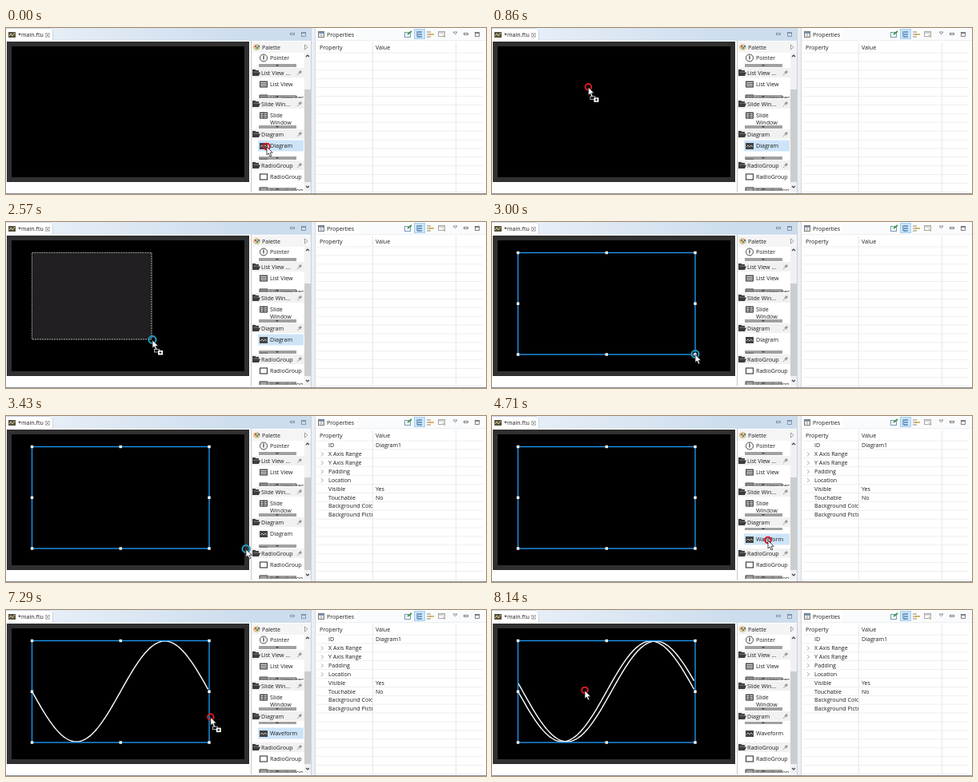
An HTML page with a canvas that plays this animation: 600 px wide and 208 px high, repeating every 8710 ms.

```html
<!DOCTYPE html>
<html lang="en">
<head>
<meta charset="utf-8">
<title>Diagram editor</title>
<style>
html, body { margin: 0; width: 100%; height: 100%; overflow: hidden; background: #fff; }
canvas { display: block; width: 600px; height: 208px; }
</style>
</head>
<body>
<canvas id="stage" width="600" height="208"></canvas>
<script>
const ctx = document.getElementById('stage').getContext('2d');
const LOOP = 8710, STEP = LOOP / 61, LAST = 57;
const INK = '#1c1c1c', DARK = '#444', BLUE = '#1e95ef', PICKED = '#cde4f8';
const BOX = { x: 32.5, y: 38.5, w: 221.5, h: 127.5 };

// Pointer way points: time, x, y
const PATH = [
  [0, 326, 149], [140, 322, 147], [1140, 42, 46], [1710, 55, 48], [2000, 33, 39],
  [2570, 183, 148], [3000, 254, 166], [3430, 300, 167], [3860, 342, 165],
  [4280, 342, 165], [4710, 345, 156], [5200, 150, 104], [5570, 150, 104],
  [6290, 303, 162], [6850, 345, 157], [7000, 345, 157], [7700, 122, 101], [8140, 116, 101]
];

function rect(x, y, w, h, color) {
  ctx.fillStyle = color;
  ctx.fillRect(x, y, w, h);
}

function frame(x, y, w, h, color, width = 1) {
  ctx.strokeStyle = color;
  ctx.lineWidth = width;
  ctx.strokeRect(x, y, w, h);
}

function line(points, color, width = 1) {
  ctx.beginPath();
  points.forEach(([x, y]) => ctx.lineTo(x, y));
  ctx.strokeStyle = color;
  ctx.lineWidth = width;
  ctx.stroke();
}

function shape(points, fill, stroke) {
  ctx.beginPath();
  points.forEach(([x, y]) => ctx.lineTo(x, y));
  ctx.closePath();
  if (fill) { ctx.fillStyle = fill; ctx.fill(); }
  if (stroke) { ctx.strokeStyle = stroke; ctx.lineWidth = 0.8; ctx.stroke(); }
}

function ring(x, y, r, color, width) {
  ctx.beginPath();
  ctx.arc(x, y, r, 0, Math.PI * 2);
  ctx.strokeStyle = color;
  ctx.lineWidth = width;
  ctx.stroke();
}

function label(text, x, y) {
  ctx.font = '7.1px "Open Sans", "Noto Sans", sans-serif';
  ctx.fillStyle = INK;
  ctx.fillText(text, x, y + 2.6);
}

function clipped(x, y, w, h, paint) {
  ctx.save();
  ctx.beginPath();
  ctx.rect(x, y, w, h);
  ctx.clip();
  paint();
  ctx.restore();
}

function windowButtons(x, y, color) {
  frame(x + 0.5, y - 0.5, 5, 2, color, 0.8);
  frame(x + 14.5, y - 1.5, 5, 5, color, 0.8);
  line([[x + 14, y - 0.7], [x + 20, y - 0.7]], color);
}

function editor() {
  const bar = ctx.createLinearGradient(58, 0, 300, 0);
  bar.addColorStop(0, '#e6eef7');
  bar.addColorStop(1, '#cddded');
  rect(0, 0, 382, 16, bar);
  rect(0, 1, 58, 16, '#fff');
  line([[0, 0.5], [55, 0.5], [58.5, 4], [58.5, 16]], '#c3cfdd', 0.8);
  rect(3, 5, 9, 7, '#56523c');
  line([[4, 10], [6, 7], [8, 10], [11, 6]], '#d6d0a0');
  label('*main.ftu', 15, 8);
  frame(49.5, 6.5, 5, 5, '#aaa', 0.7);
  line([[50, 7], [54, 11]], '#888', 0.8);
  line([[54, 7], [50, 11]], '#888', 0.8);
  windowButtons(355, 7, '#7488a0');
  rect(1, 17, 303, 176, '#303030');
  rect(7, 23, 291, 164, '#000');
  rect(381, 0, 1, 207, '#c8d2de');
  rect(382, 0, 4, 207, '#eceff3');
}

function folder(y) {
  shape([[308, y - 4], [311.5, y - 4], [312.5, y - 3], [316, y - 3], [316, y - 0.5],
    [318, y - 0.5], [316, y + 4], [308, y + 4]], '#3c3c3c');
  line([[309.5, y - 0.8], [316, y - 0.8]], '#aaa', 0.6);
}

function section(name, y) {
  rect(307, y - 6, 66, 12, '#f1f1f1');
  folder(y);
  label(name, 319, y);
  line([[364, y + 3], [366, y + 1]], '#888', 0.8);
  shape([[366, y - 1], [368, y - 3], [370, y - 1], [368, y + 1], [368, y + 2], [365, y - 1]], '#999');
}

function icon(kind, y) {
  if (kind === 'gauge') {
    ring(322, y, 4.5, DARK, 1);
    line([[322, y - 3], [322, y + 2]], '#333', 1.2);
    return;
  }
  if (kind === 'radio') {
    frame(317.5, y - 3.5, 9, 7, DARK, 1.2);
    return;
  }
  rect(317, y - 4, 10, 8, DARK);
  if (kind === 'wave') {
    line([[318, y + 1], [320, y - 1], [322, y + 1], [324, y - 1], [326, y + 1]], '#ddd', 0.8);
    return;
  }
  [-2, 0, 2].forEach(d => line([[318, y + d], [326, y + d]], '#e4e4e4', 1.1));
  if (kind === 'slide') line([[322, y - 4], [322, y + 4]], DARK);
}

function item(kind, text, y, picked) {
  if (picked) rect(315, y - 7, 57, 14, PICKED);
  icon(kind, y + 0.5);
  label(text, 330, y);
}

function scroller(y, up) {
  rect(316, y, 47, 4, 'rgba(125,125,125,.72)');
  shape(up ? [[337, y + 3], [341, y + 3], [339, y + 1]] : [[337, y + 1], [341, y + 1], [339, y + 3]], DARK);
}

// Top slice of the next entry in a scrolled list
function peek(kind, text, y) {
  clipped(315, y - 2, 57, 6, () => item(kind, text, y + 3));
  scroller(y);
}

function palette(tool, scroll) {
  rect(306, 16, 75, 191, '#fff');
  line([[306.5, 16], [306.5, 206]], '#c8c8c8');
  rect(307, 17, 74, 14, '#f5f5f5');
  ctx.beginPath();
  ctx.ellipse(313.5, 24, 4.5, 4, 0, 0, 7);
  ctx.fillStyle = '#d9c49a';
  ctx.fill();
  ['#d04b38', '#4d9a48', '#4677b8'].forEach((c, i) => rect(311 + i * 2, 22 + i % 2 * 2, 2, 2, c));
  label('Palette', 320, 24);
  shape([[373.5, 21], [377, 24], [373.5, 27]], '#fff', '#888');

  clipped(307, 31, 66, 18, () => item('gauge', 'Pointer', 37));
  scroller(45);
  section('List View ...', 56);
  item('list', 'List View', 70);
  peek('list', 'List View Item', 84);
  section('Slide Win...', 95);
  item('slide', 'Slide', 109);
  label('Window', 330, 118);
  scroller(122);
  section('Diagram', 133);
  clipped(307, 140, 66, 25, () => {
    item('wave', 'Diagram', 147.5 - scroll, tool === 'diagram');
    item('wave', 'Waveform', 167 - scroll, tool === 'waveform');
    if (scroll < 12) scroller(161);
    if (scroll > 0) scroller(139, true);
  });
  section('RadioGroup', 172);
  item('radio', 'RadioGroup', 186);
  peek('radio', 'RadioButton', 200);

  rect(373, 31, 8, 174, '#f1f1f1');
  rect(373, 77, 8, 116, '#cdcdcd');
  line([[375, 36], [377, 34], [379, 36]], DARK, 1.2);
  line([[375, 198], [377, 200], [379, 198]], DARK, 1.2);
}

function properties(filled) {
  rect(386, 0, 214, 207, '#fff');
  rect(386, 0, 1, 207, '#d3d9e0');
  rect(438, 1, 162, 15, '#fafbfc');
  rect(387, 15, 213, 1, '#eceff2');
  frame(390.5, 4.5, 7, 7, '#777');
  rect(391, 5, 6, 2, '#7894b5');
  line([[391, 9], [397, 9]], '#999', 0.7);
  line([[394, 7], [394, 11]], '#999', 0.7);
  label('Properties', 401, 8);

  frame(498.5, 5.5, 7, 6, '#7897b4');
  line([[502, 8], [507, 4]], '#3e9a4b', 2);
  rect(510, 1, 14, 13, '#cbe5fb');
  frame(510.5, 1.5, 13, 12, '#a5cfef');
  line([[514, 4], [514, 11], [516, 11]], '#52708e');
  [5, 8, 11].forEach(y => line([[515, y], [520, y]], '#3f78aa', 1.3));
  [5, 8, 11].forEach(y => line([[526, y], [531, y]], '#948467'));
  line([[529, 8], [535, 8]], '#d49c37', 1.5);
  frame(540.5, 4.5, 8, 6, '#aaa');
  line([[541, 6], [549, 6]], '#aaa');
  line([[546, 8], [549, 12]], '#bbaa88');
  shape([[559, 5], [564, 5], [561.5, 8]], '#fff', '#777');
  windowButtons(572, 7, '#666');

  for (let i = 0; i < 17; i++) {
    const y = 31 + i * 10.9;
    line([[388, y], [596, y]], '#eeeef0');
  }
  [458.5, 562.5].forEach(x => line([[x, 18], [x, 206]], '#e8e8ea'));
  label('Property', 392, 24);
  label('Value', 462, 24);
  if (!filled) return;

  const rows = ['ID', '>X Axis Range', '>Y Axis Range', '>Padding', '>Location',
    'Visible', 'Touchable', 'Background Color', 'Background Picture'];
  const values = { ID: 'Diagram1', Visible: 'Yes', Touchable: 'No' };
  rows.forEach((name, i) => {
    const y = 36.5 + i * 10.9;
    if (name[0] === '>') line([[394, y - 2], [396.5, y + 0.5], [394, y + 3]], '#999', 0.9);
    clipped(387, 30, 71, 176, () => label(name.replace('>', ''), 403, y));
    if (values[name]) label(values[name], 462, y);
  });
}

function wave(shift) {
  const points = [];
  for (let x = 0; x <= BOX.w; x += 2) {
    points.push([BOX.x + x, 102 + 63 * Math.sin((x - shift) / BOX.w * Math.PI * 2)]);
  }
  line(points, '#fff', 1.4);
}

function diagram(waves) {
  const { x, y, w, h } = BOX;
  for (let i = 0; i < waves; i++) wave(i * 6);
  frame(x, y, w, h, BLUE, 1.4);
  for (let i = 0; i < 3; i++) {
    for (let j = 0; j < 3; j++) {
      if (i !== 1 || j !== 1) rect(x + i * w / 2 - 1.7, y + j * h / 2 - 1.7, 3.4, 3.4, '#fff');
    }
  }
}

function rubberBand(p) {
  const w = p.x - 33.5, h = p.y - 39.5;
  if (w < 1 || h < 1) return;
  rect(33, 39, w, h, '#211f22');
  ctx.setLineDash([2, 1]);
  frame(32.5, 38.5, w, h, '#aaa');
  ctx.setLineDash([]);
}

function pointer({ x, y }, busy, badge) {
  if (busy) {
    ring(x, y - 0.5, 4.5, '#176f8c', 2.4);
    ring(x, y - 0.5, 4.5, '#35b4d6', 1);
  } else {
    ring(x, y - 0.5, 3.8, '#d91a22', 2);
  }
  const arrow = [[0, 0], [0, 10], [2.3, 8], [4, 12], [5.8, 11.2], [4.1, 7.4], [7.2, 7.2]];
  shape(arrow.map(([a, b]) => [x + a, y + b]), '#fff', '#222');
  if (!badge) return;
  frame(x + 2.5, y + 11.5, 6, 3.5, '#ddd', 0.8);
  rect(x + 7, y + 13, 6, 5.5, '#fff');
  line([[x + 8.5, y + 15.7], [x + 11.5, y + 15.7]], '#111');
  line([[x + 10, y + 14.2], [x + 10, y + 17.2]], '#111');
}

function pointerAt(t) {
  const i = PATH.findIndex(p => p[0] > t);
  if (i < 0) return { x: 116, y: 101 };
  const [t0, x0, y0] = PATH[i - 1], [t1, x1, y1] = PATH[i];
  const k = (t - t0) / (t1 - t0);
  return { x: x0 + (x1 - x0) * k, y: y0 + (y1 - y0) * k };
}

function draw(now) {
  const tick = Math.min(LAST, Math.floor((now % LOOP + 5) / STEP));
  const t = Math.round(tick * STEP / 10) * 10;
  const p = pointerAt(t);
  const within = (a, b) => t >= a && t < b;
  const tool = t < 3000 ? 'diagram' : within(4570, 5400) || within(6850, 7850) ? 'waveform' : '';
  const scroll = 12.5 * Math.max(0, Math.min(1, (t - 3860) / 420));

  rect(0, 0, 600, 208, '#fff');
  editor();
  palette(tool, scroll);
  properties(t >= 3140);
  rect(0, 207, 600, 1, '#8b9199');
  if (within(2000, 3000)) rubberBand(p);
  if (t >= 3000) diagram((t >= 5400) + (t >= 7850));
  pointer(p, within(2100, 3570), tool && p.x < 298);
}

function loop() {
  draw(performance.now() - start);
  requestAnimationFrame(loop);
}

const start = performance.now();
loop();
</script>
</body>
</html>
```
